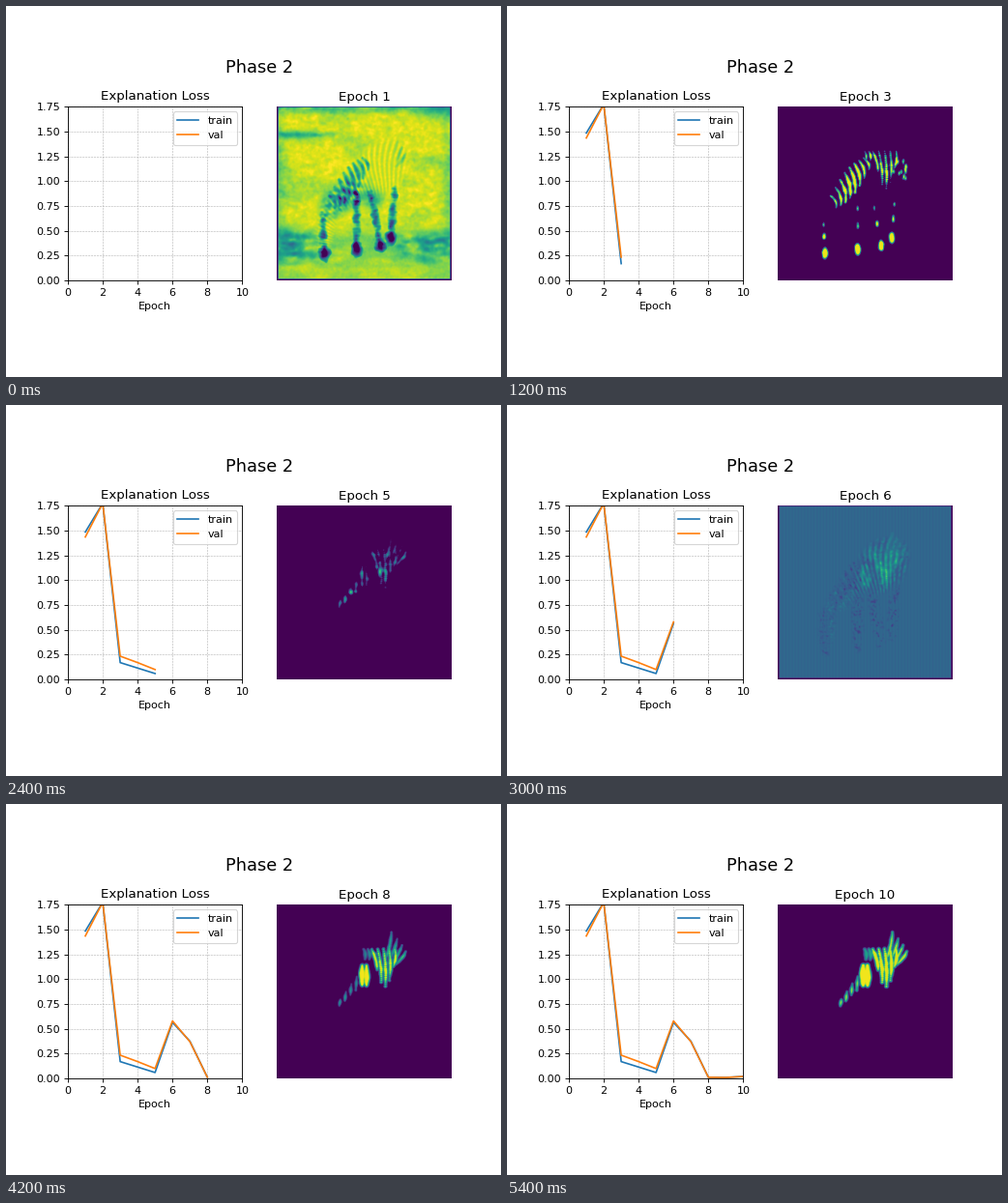
These frames come from a looping animation (512x384 px, 6 s). A matplotlib script:

```python
import numpy as np
import matplotlib.pyplot as plt
from matplotlib.animation import FuncAnimation

N = 224
rng = np.random.default_rng(4)
J, I = np.meshgrid(np.arange(N), np.arange(N))
# Grid positions in stage pixels
X = 280.4 + (J + 0.5) * 180.4 / N
Y = 103.7 + (I + 0.5) * 180.4 / N


def noise(sx, sy):
    """Seeded gaussian noise blurred by sx, sy cells, unit deviation."""
    fx, fy = np.meshgrid(np.fft.fftfreq(N), np.fft.fftfreq(N))
    low = np.exp(-2 * np.pi**2 * ((fx * sx)**2 + (fy * sy)**2))
    n = np.fft.ifft2(np.fft.fft2(rng.normal(size=(N, N))) * low).real
    return n / n.std()


def stroke(x0, y0, x1, y1, w, bend=0.0):
    """Signed depth inside a tapered, bent line (positive inside)."""
    depth = np.full((N, N), -99.0)
    for t in np.linspace(0, 1, 18):
        cx = x0 + (x1 - x0) * t + bend * 4 * t * (1 - t)
        cy = y0 + (y1 - y0) * t
        r = w * (0.4 + 0.6 * np.sin(np.pi * t))
        depth = np.maximum(depth, r - np.hypot(X - cx, Y - cy))
    return depth


def oval(cx, cy, rx, ry):
    r = np.hypot((X - cx) / rx, (Y - cy) / ry)
    return (1 - r) * min(rx, ry)


def union(parts):
    return np.maximum.reduce(list(parts))


def mask(depth, soft=1.5):
    return np.clip(depth / soft + 0.5, 0, 1)


def ramp(v, a, b):
    t = np.clip((v - a) / (b - a), 0, 1)
    return t * t * (3 - 2 * t)


def glow(cx, cy, rx, ry):
    return np.exp(-((X - cx) / rx)**2 - ((Y - cy) / ry)**2)


def neck_stripe(t):
    cx, cy = 339 + 34 * t, 203 - 39 * t
    swell = np.sin(np.pi * t)
    h = 6 + 7 * swell
    return stroke(cx - 4, cy - h, cx + 1.5, cy + h, 1.3 + 0.9 * swell, 2.4)


def body_stripe(k):
    x = 381 + 5 * k
    low = 162 + 27 * np.sin(np.pi * (k + 0.6) / 5)
    return stroke(x - 2.5 + k, 151, x + 3 - 0.8 * k, low, 1.9, 1.2)


def finger(t):
    x, y, a, size = 393 + 10 * t, 161 + 6 * t, 0.2 + 0.45 * t, 28 - 11 * t
    return stroke(x, y, x + size * np.sin(a), y - size * np.cos(a), 1.9, 1)


def tail_mark(t):
    x, y, h = 363 - 17 * t, 186 + 20 * t, 7 - 4 * t
    return stroke(x, y - h, x - 1, y + h, 1.5)


fine, mid = noise(1, 1), noise(2.2, 1.8)
streak, patch = noise(6, 2.5), noise(14, 8)

neck = union(map(neck_stripe, np.linspace(0, 1, 8)))
body = union(map(body_stripe, range(5)))
fingers = union(map(finger, np.linspace(0, 1, 4)))
shoulder = union(stroke(x, 168, x, 188, 2.9) for x in (368.5, 373))
tuft = union(stroke(x, 151, x + 1.5, 161, 1.7, 1) for x in (370, 374.5))
tail = union(map(tail_mark, np.linspace(0, 1, 4)))

# Each leg runs from hip to hoof; the first is the lowered head
limbs = [(327, 214, 329, 256), (363, 192, 363, 252),
         (377, 193, 387, 248), (402, 190, 398, 240)]
legs = union(stroke(*p, 3) for p in limbs)
feet = union(oval(x1, y1, 4.5, 6.5) for _, _, x1, y1 in limbs)
spots = union(oval(x0 + (x1 - x0) * t, y0 + (y1 - y0) * t, r, 2 * r)
              for x0, y0, x1, y1 in limbs
              for t, r in ((0.3, 0.9), (0.6, 1.4), (1, 2.9)))
rump = union(oval(x, y, 1.2, 2.4) for x, y in
             zip(rng.uniform(399, 413, 9), rng.uniform(147, 184, 9)))

trunk = stroke(402, 150, 374, 184, 24)
throat = stroke(376, 168, 334, 212, 13)
beast = mask(union([trunk, throat, stroke(334, 206, 328, 252, 8)]), 8)
# Fine stripes fan out and curl towards the rump
angle = np.arctan2(X - 384 + 3 * np.sin((Y - 135) / 14), 255 - Y)
fan = np.cos(angle * 2 * np.pi / 0.055)


def framed(f):
    f = np.clip(f, 0, 1)
    f[:2] = f[-2:] = 0
    f[:, :2] = f[:, -2:] = 0
    return f


def meadow():
    f = 0.94 + 0.022 * mid + 0.012 * fine
    f -= 0.04 * np.clip(patch, 0, 2)
    f -= ramp(-Y, -116, -105) * (0.2 + 0.06 * streak)
    f -= glow(300, 134, 38, 4) * (0.3 + 0.06 * streak)
    f -= 0.18 * glow(460, 112, 35, 9) + 0.12 * glow(282, 190, 9, 80)
    f -= 0.15 * glow(460, 200, 10, 60)
    sides = 0.35 + glow(292, 246, 36, 22) + 0.8 * glow(435, 248, 36, 18)
    grass = ramp(Y, 222, 242) * (1 - 0.45 * ramp(Y, 262, 274))
    f -= grass * sides * np.clip(0.24 + 0.07 * streak + 0.06 * mid, 0, 0.6)
    coat = 0.93 + 0.05 * fan + 0.01 * fine
    f += beast * (coat - f)
    f -= 0.2 * mask(throat + 4, 10) * ramp(Y, 172, 200) * (1 + 0.5 * mid)
    f -= mask(neck, 3) * (0.42 + 0.1 * mid)
    f -= 0.2 * mask(fingers - 0.4, 3) * ramp(X, 398, 410)
    f -= 0.3 * glow(380, 200, 10, 9) + 0.15 * glow(352, 198, 12, 6)
    f -= mask(legs + 0.5 * mid, 4) * (0.48 + 0.12 * mid)
    return f - mask(feet + 0.8 * mid, 4) * 0.75


def cut(thin):
    on = union([neck - 0.2 - 0.8 * thin, body - 0.6 - 0.7 * thin,
                tuft - 0.8 - 0.8 * thin, rump - 0.3 - thin,
                spots - 1.6 * thin])
    return 0.97 * mask(on + 0.25 * mid, 1.2)


def sparks():
    on = union([shoulder - 1.4, body - 1, fingers - 1.2, tail - 0.5])
    f = 0.6 * mask(on + 0.7 * mid - 0.5, 2.4) * ramp(Y, 136, 152)
    hot = union([oval(387, 173, 1.6, 4), oval(357, 194, 1.8, 2)])
    return np.maximum(f, 0.72 * mask(hot, 2))


def relief(base, gain, spread):
    """Flat ground with a faint raised and carved figure on it."""
    f = base + 0.04 * beast * fine * (0.6 + 0.4 * fan)
    f -= 0.11 * mask(neck, 3) * np.clip(0.4 + fine, 0, 1.6)
    f -= 0.07 * mask(legs + 2, 6) * np.clip(fine, 0, 2)
    f += 0.07 * beast * np.clip(fan, -0.8, 1) * ramp(X, 345, 372)
    lit = mask(union([shoulder, body]), 4) * (0.75 + 0.3 * mid)
    f += gain * np.clip(lit * glow(386, 175, 30, 24), 0, 1.2)
    f += spread * (mask(fingers, 3) + 0.7 * mask(tail + 0.5, 3)
                   + 0.5 * mask(tuft + 0.5, 3))
    return f


def hand(gain):
    def lit(depth, level):
        return level * mask(depth + 0.2 * mid + gain, 2.6)
    return np.clip(union([
        lit(shoulder + 0.5, 1), lit(body + 0.1, 0.95),
        lit(fingers - 0.5, 0.75 + 0.25 * gain),
        lit(tuft, 0.45 + 0.2 * gain),
        lit(tail - 0.5, 0.65 + 0.35 * gain)]), 0, 0.98)


field = meadow()
maps = [
    framed(field), framed(0.25 + 0.8 * field),
    cut(0), cut(1), sparks(),
    framed(relief(0.33 + 0.012 * np.cos(np.pi * J / 2), 0.33, 0.08)),
    framed(relief(0.225 + 0.008 * np.cos(np.pi * I / 2), 0.5, 0.27)),
    hand(0), hand(0.3), hand(0.6),
]

epochs = np.arange(1, 11)
train = [1.485, 1.775, 0.17, 0.115, 0.06, 0.565, 0.375, 0.012, 0.01, 0.02]
val = [1.435, 1.775, 0.235, 0.17, 0.10, 0.58, 0.37, 0.012, 0.01, 0.02]

fig, (ax, pic) = plt.subplots(1, 2, figsize=(6.4, 4.8), dpi=80)
fig.suptitle("Phase 2", x=0.5125, y=0.858, fontsize=16)

ax.set_box_aspect(1)
ax.set(xlim=(0, 10), ylim=(0, 1.755), xlabel="Epoch",
       xticks=range(0, 11, 2), yticks=np.arange(0, 1.8, 0.25))
ax.set_title("Explanation Loss")
ax.grid(linestyle="--", linewidth=0.5)
train_line, = ax.plot([], [], label="train")
val_line, = ax.plot([], [], label="val")
ax.legend(loc="upper right")

pic.axis("off")
image = pic.imshow(maps[0], cmap="viridis", vmin=0, vmax=1)
title = pic.set_title("Epoch 1", pad=5)


def update(i):
    n = i + 1
    train_line.set_data(epochs[:n], train[:n])
    val_line.set_data(epochs[:n], val[:n])
    image.set_data(maps[i])
    title.set_text(f"Epoch {n}")
    return train_line, val_line, image, title


anim = FuncAnimation(fig, update, frames=10, interval=600, repeat=True)
plt.show()
```
